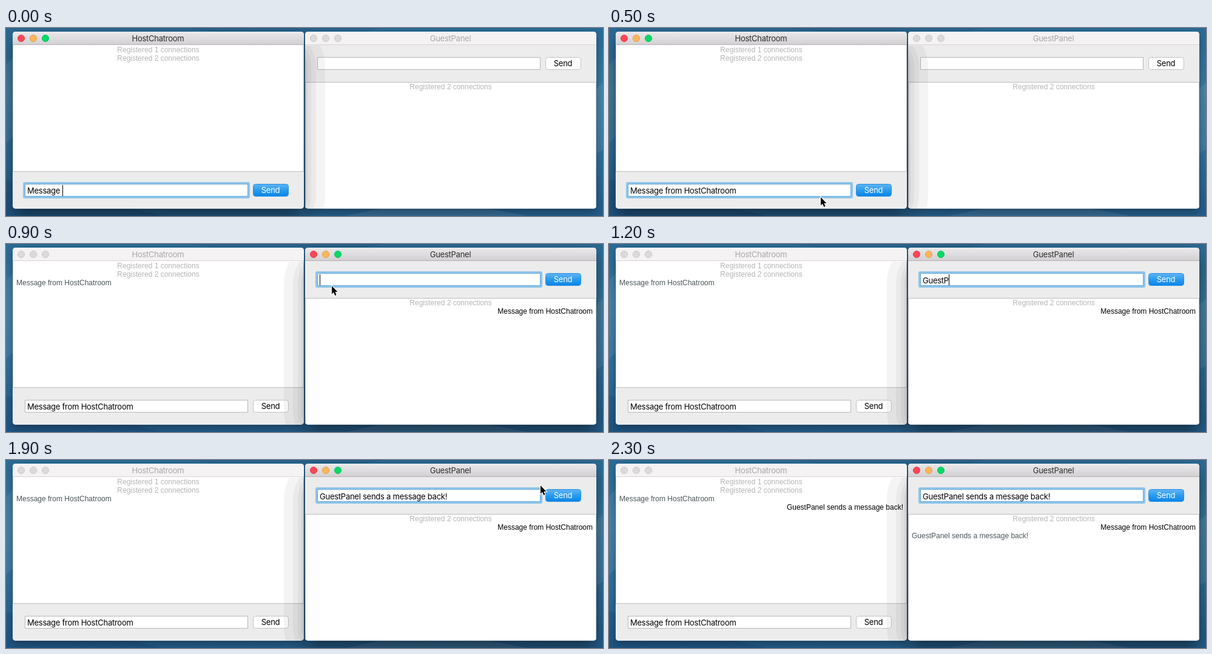
An HTML page with a canvas for the animation above (3300 ms loop, 984x310 px).

```html
<!DOCTYPE html>
<html lang="en">
<head>
<meta charset="utf-8">
<title>Two chat windows</title>
<style>
  html, body { margin: 0; width: 100%; height: 100%; overflow: hidden; background: #2a6792; }
  canvas { display: block; width: 100%; height: 100%; }
</style>
</head>
<body>
<canvas id="stage" width="984" height="310"></canvas>
<script>
const ctx = document.getElementById('stage').getContext('2d');
const STEP = 100, LOOP = 3300, LAST_STEP = 23;
const HOST = 'HostChatroom', GUEST = 'GuestPanel';
const MESSAGE = `Message from ${HOST}`, REPLY = `${GUEST} sends a message back!`;
const UI_FONT = '13px Inter, "Open Sans", sans-serif';
const LOG_FONT = '12px "Liberation Sans", Arial, sans-serif';
const GREY = '#b4b4b4', SLATE = '#4b5559';
const WIDTH = 480, HEIGHT = 292, TOP = 6;

const host = { x: 11, title: HOST, chat: [28, 208], line: 236, field: [31, 257], button: [407, 257] };
const guest = { x: 493, title: GUEST, chat: [90, 207], line: 89, field: [513, 48.5], button: [889, 48] };

// Pointer position by step; it is hidden while typing.
const pointer = {
  5: [349, 279], 6: [432, 266], 7: [436, 267], 8: [485, 146], 9: [537, 69],
  19: [881, 42], 20: [912, 56], 21: [914, 57], 22: [914, 57]
};

function box(x, y, w, h, fill, r = 0, stroke) {
  ctx.beginPath();
  ctx.roundRect(x, y, w, h, r);
  if (fill) { ctx.fillStyle = fill; ctx.fill(); }
  if (stroke) { ctx.strokeStyle = stroke; ctx.lineWidth = 1; ctx.stroke(); }
}

function shade(y0, y1, ...colors) {
  const g = ctx.createLinearGradient(0, y0, 0, y1);
  colors.forEach((c, i) => g.addColorStop(i / (colors.length - 1), c));
  return g;
}

function polygon(points, fill) {
  ctx.beginPath();
  points.forEach(([x, y]) => ctx.lineTo(x, y));
  ctx.closePath();
  ctx.fillStyle = fill;
  ctx.fill();
}

function text(str, x, y, color, align = 'left', font = UI_FONT) {
  ctx.font = font;
  ctx.letterSpacing = font === UI_FONT ? '-0.25px' : '0px';
  ctx.textAlign = align;
  ctx.fillStyle = color;
  ctx.fillText(str, x, y);
}

function desktop() {
  box(0, 0, 984, 310, shade(0, 310, '#2a6a95', '#38799f', '#2f6e9a', '#245c89'));
  polygon([[0, 60], [40, 20], [40, 150], [0, 190]], '#ffffff12');
  polygon([[0, 250], [260, 310], [0, 310]], '#0a306028');
  polygon([[560, 310], [700, 280], [860, 310]], '#ffffff14');
  polygon([[984, 90], [940, 130], [940, 230], [984, 200]], '#ffffff14');
  polygon([[300, 0], [620, 0], [560, 12], [380, 12]], '#0a306020');
}

function windowShadow(win, active) {
  ctx.save();
  ctx.shadowColor = active ? '#00000080' : '#00000050';
  ctx.shadowBlur = active ? 28 : 14;
  ctx.shadowOffsetY = active ? 12 : 6;
  box(win.x, TOP, WIDTH, HEIGHT, '#ececec', 5);
  ctx.restore();
}

// The front window's shadow falls on its neighbour in visible bands.
function bandedShadow(front, back) {
  ctx.save();
  ctx.beginPath();
  ctx.rect(back.x, 29, WIDTH, HEIGHT - 23);
  ctx.clip();
  [[35, .045], [20, .04], [12, .045], [6, .06]].forEach(([spread, alpha]) =>
    box(front.x - spread, TOP + 18 - spread, WIDTH + 2 * spread, HEIGHT + 2 * spread,
      `rgba(20,10,20,${alpha})`, 40 + spread));
  ctx.restore();
}

function drawWindow(win, active, typed, caret) {
  const { x, field: [fx, fy], button: [bx, by] } = win;
  ctx.save();
  box(x, TOP, WIDTH, HEIGHT, '#ececec', 5);
  ctx.clip();
  box(x, TOP, WIDTH, 22, active ? shade(6, 28, '#ebe9eb', '#d1cfd1') : '#f5f2f4');
  box(x, 27, WIDTH, 1, active ? '#b3b1b3' : '#d5d3d5');
  box(x, win.chat[0], WIDTH, win.chat[1], '#fff');
  box(x, win.line, WIDTH, 1, '#bebebe');
  box(x, win.chat[0], 1, win.chat[1], '#c9c9c9');
  box(x + WIDTH - 1, win.chat[0], 1, win.chat[1], '#c9c9c9');
  ctx.restore();

  const lights = active ? ['#fb4657', '#fdb55c', '#04da66'] : Array(3).fill('#dcdadc');
  const rims = active ? ['#e23a48', '#e0a044', '#08bd58'] : Array(3).fill('#c9c7c9');
  lights.forEach((c, i) => box(x + 8.5 + 20 * i, 11.5, 11, 11, c, 5.5, rims[i]));
  text(win.title, x + 239.5, 22, active ? '#2c2c2c' : '#a9a7a9', 'center');

  const top = Math.floor(fy);
  if (active) {
    box(fx - 3, top - 3, 374, 27, '#8fc5ea', 3);
    box(fx + .5, top + .5, 367, 20, '#fff', 0, '#63a9da');
  } else {
    box(fx + .5, top + .5, 367, 20, '#fff', 0, '#b7b7b7');
  }
  const base = fy + 16;
  text(typed, fx + 4, Math.round(base), '#000');
  if (caret) box(Math.round(fx + 4 + ctx.measureText(typed).width), top + 2, 1, 18, '#000');

  if (active) box(bx + .5, by + .5, 58, 20, shade(by, by + 21, '#62b6f4', '#2b9bee', '#0784e6'), 4, '#2a8fe0');
  else box(bx + .5, by + .5, 58, 20, '#fff', 4, '#c2c2c2');
  text('Send', bx + 29, by + 15, active ? '#fff' : '#000', 'center');
}

function log(win, lines) {
  const place = { left: win.x + 6, center: win.x + 240, right: win.x + 474 };
  lines.forEach(([str, align, color], i) =>
    text(str, place[align], win.chat[0] + (win === host ? 12 : 11) + 14 * i, color, align, LOG_FONT));
}

function arrow(x, y) {
  ctx.save();
  ctx.translate(x, y);
  ctx.beginPath();
  [[0, 0], [0, 13.5], [3, 10.8], [5.3, 16], [7.6, 15], [5.4, 9.9], [9.6, 9.9]]
    .forEach(([px, py]) => ctx.lineTo(px, py));
  ctx.closePath();
  ctx.strokeStyle = '#fff';
  ctx.lineWidth = 2;
  ctx.stroke();
  ctx.fillStyle = '#000';
  ctx.fill();
  ctx.restore();
}

function beam(x, y) {
  box(x, y - 6, 1, 13, '#222');
  box(x - 2, y + 1, 5, 1, '#222');
  for (const dy of [-7, 7]) {
    box(x - 3, y + dy, 3, 1, '#222');
    box(x + 1, y + dy, 3, 1, '#222');
  }
}

function draw(ms) {
  const step = Math.min(LAST_STEP, Math.floor((ms % LOOP) / STEP));
  const sent = step >= 7, replied = step >= 21, guestActive = step >= 9;
  const messageLength = Math.min(MESSAGE.length, Math.floor(8 + 4.25 * step));
  const replyLength = step <= 12 ? Math.max(0, 2 * (step - 9)) : Math.round(6 + 4.4 * (step - 12));

  const paint = {
    host: () => drawWindow(host, !guestActive, MESSAGE.slice(0, messageLength), step < 5 || step === 8),
    guest: () => drawWindow(guest, guestActive, REPLY.slice(0, replyLength), guestActive && step < 18)
  };

  desktop();
  windowShadow(host, !guestActive);
  windowShadow(guest, guestActive);
  if (guestActive) {
    paint.host();
    bandedShadow(guest, host);
    paint.guest();
  } else {
    paint.guest();
    bandedShadow(host, guest);
    paint.host();
  }

  const hostLog = [1, 2].map(n => [`Registered ${n} connections`, 'center', GREY]);
  const guestLog = [hostLog[1]];
  if (sent) {
    hostLog.push([MESSAGE, 'left', SLATE]);
    guestLog.push([MESSAGE, 'right', '#000']);
  }
  if (replied) {
    hostLog.push([REPLY, 'right', '#000']);
    guestLog.push([REPLY, 'left', SLATE]);
  }
  log(host, hostLog);
  log(guest, guestLog);

  if (pointer[step]) (step === 8 ? beam : arrow)(...pointer[step]);
}

const start = performance.now();
function tick() {
  draw(performance.now() - start);
  requestAnimationFrame(tick);
}
tick();
</script>
</body>
</html>
```
